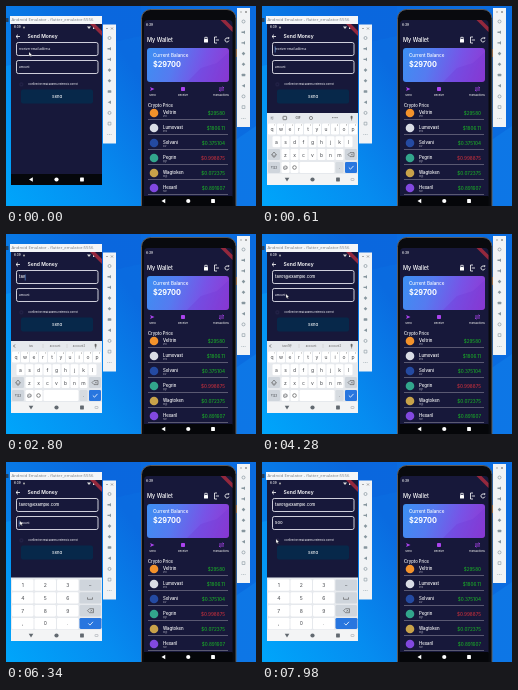
Animation, 250 px wide and 200 px high, one loop 8 s. Source, as an HTML page with a canvas:

```html
<!DOCTYPE html>
<html lang="en">
<head>
<meta charset="utf-8">
<style>
html, body { margin: 0; width: 100%; height: 100%; overflow: hidden; background: #0873d8 }
canvas { display: block; width: 250px; height: 200px }
</style>
</head>
<body>
<canvas id="stage" width="250" height="200"></canvas>
<script>
const c = document.getElementById('stage').getContext('2d');
const LOOP = 8000, NAVY = '#17183a', EMAIL = 'tavo1@example.com';

function box(x, y, w, h, fill, r = 0, stroke, width = 0.8) {
  c.beginPath();
  c.roundRect(x, y, w, h, r);
  if (fill) { c.fillStyle = fill; c.fill(); }
  if (stroke) { c.strokeStyle = stroke; c.lineWidth = width; c.stroke(); }
}
function dot(x, y, r, fill, stroke) {
  c.beginPath();
  c.arc(x, y, r, 0, 7);
  if (fill) { c.fillStyle = fill; c.fill(); }
  if (stroke) { c.strokeStyle = stroke; c.lineWidth = 0.7; c.stroke(); }
}
function path(points, color, filled, width = 0.8) {
  c.beginPath();
  points.forEach(([x, y]) => c.lineTo(x, y));
  if (filled) { c.closePath(); c.fillStyle = color; c.fill(); }
  else { c.strokeStyle = color; c.lineWidth = width; c.stroke(); }
}
function text(s, x, y, size, color = '#fff', align = 'left', weight = 500, font = 'Inter') {
  c.font = `${weight} ${size}px "${font}", sans-serif`;
  c.fillStyle = color;
  c.textAlign = align;
  c.textBaseline = 'middle';
  c.fillText(s, x, y);
}
function gradient(x0, y0, x1, y1, ...colors) {
  const g = c.createLinearGradient(x0, y0, x1, y1);
  colors.forEach((color, i) => g.addColorStop(i / (colors.length - 1), color));
  return g;
}
// Last value whose start time has passed
const stepAt = (steps, t) => steps.reduce((v, [at, n]) => t >= at ? n : v, 0);
const ease = (t, start, length) => {
  const p = Math.min(1, Math.max(0, (t - start) / length));
  return 1 - (1 - p) ** 3;
};

function wallpaper() {
  box(0, 0, 250, 200, gradient(0, 190, 220, 40, '#00a4fa', '#068cf0', '#0a6be0', '#0a6ce0'));
  path([[0, 0], [135, 0], [135, 30], [0, 60]], '#0a62d855', true);
  path([[228, 135], [250, 120], [250, 200], [228, 200]], '#1288ee66', true);
}

function toolbar(x, y) {
  box(x, y, 13, 119, '#f1f3f5');
  path([[x + 3, y + 4], [x + 5, y + 4]], '#777', false, 0.6);
  path([[x + 8, y + 3], [x + 10, y + 5]], '#777', false, 0.6);
  path([[x + 10, y + 3], [x + 8, y + 5]], '#777', false, 0.6);
  const cx = x + 6.5, ink = '#87969e';
  for (let i = 0; i < 10; i++) {
    const cy = y + 13.5 + i * 10.7;
    if (i == 0 || i == 7) dot(cx, cy, 1.5, null, ink);
    else if (i == 1 || i == 2) path([[cx - 2, cy - 0.7], [cx, cy - 0.7], [cx + 1.5, cy - 1.8], [cx + 1.5, cy + 1.8], [cx, cy + 0.7], [cx - 2, cy + 0.7]], ink, true);
    else if (i == 3 || i == 4) path([[cx - 1.8, cy], [cx, cy - 1.8], [cx + 1.8, cy], [cx, cy + 1.8]], ink, true);
    else if (i == 5) box(cx - 1.8, cy - 1.3, 3.6, 2.6, ink, 0.6);
    else if (i == 6) path([[cx + 1.5, cy - 1.8], [cx - 1.8, cy], [cx + 1.5, cy + 1.8]], ink, true);
    else if (i == 8) box(cx - 1.4, cy - 1.4, 2.8, 2.8, null, 0, ink, 0.6);
    else text('•••', cx, cy, 3.2, ink, 'center');
  }
}

function navBar(x, y, w, h, bg, ink, down) {
  box(x, y, w, h, bg);
  const cy = y + h / 2, a = x + w * 0.22, b = x + w * 0.78;
  path(down
    ? [[a - 2.3, cy - 1.8], [a + 2.3, cy - 1.8], [a, cy + 2]]
    : [[a - 2, cy], [a + 1.8, cy - 2.3], [a + 1.8, cy + 2.3]], ink, true);
  dot(x + w / 2, cy, 2.1, ink);
  box(b - 1.9, cy - 1.9, 3.8, 3.8, ink, 0.4);
  if (down) box(x + w - 7, cy - 1, 3, 2, null, 0.4, '#a5aab0', 0.6);
}

function banner(right, top) {
  path([[right - 12, top], [right - 7, top], [right, top + 7], [right, top + 12]], '#94283d', true);
}

function wallet() {
  box(229, 43, 2.5, 8, '#c77b3d');
  box(135.5, 3.5, 94.5, 205, '#090a0e', 9, '#5f5a57', 1);
  box(138, 14, 88.5, 177, NAVY, [4, 4, 0, 0]);
  text('6:39', 140, 19, 3.2);
  banner(226.5, 14);
  text('My Wallet', 141, 34, 5.5);
  box(198, 33, 4, 3.6, '#fff', 0.5);
  path([[198.8, 33], [198.8, 31.3], [201.2, 31.3], [201.2, 33]], '#fff');
  path([[211, 31], [208.5, 31], [208.5, 37], [211, 37]], '#fff');
  path([[209.8, 34], [213, 34]], '#fff');
  c.beginPath();
  c.arc(221, 34, 2, 0.3, 5.5);
  c.stroke();
  path([[221.5, 31.5], [223.3, 31.2], [223, 33.2]], '#fff', true);

  box(141, 42, 82, 34, gradient(141, 45, 223, 72, '#3d8ff3', '#557bf0', '#7853e6', '#9038d2'), 3);
  path([[181, 76], [195, 62], [211, 57], [223, 46], [223, 73], [220, 76]], '#6f35d144', true);
  text('Current Balance', 147, 50, 4.6);
  text('$29700', 147, 59, 7.3, '#fff', 'left', 700);

  const pink = '#ab43ee';
  path([[144, 81], [148.5, 83], [144, 85], [145, 83]], pink, true);
  box(175, 81, 4, 4, pink, 0.7);
  path([[213, 82], [218, 82], [216.5, 80.7]], pink);
  path([[218, 84], [213, 84], [214.5, 85.3]], pink);
  ['Send', 'Receive', 'Transactions'].forEach((s, i) => text(s, [146.5, 177, 215][i], 89.7, 2.6, '#eee', 'center'));
  text('Crypto Price', 142, 100, 4.2);

  const coins = [
    ['Veltrin', 'vtn', '$29580', '#f3922b'],
    ['Lumovast', 'lmv', '$1806.11', '#d9dce5'],
    ['Solvani', 'slv', '$0.375104', '#244aa1'],
    ['Pegrin', 'pgr', '$0.998875', '#32a58c'],
    ['Wagtoken', 'wgt', '$0.072375', '#c8a24a'],
    ['Hexaril', 'hxr', '$0.891607', '#8148df']
  ];
  coins.forEach(([name, code, price, color], i) => {
    const y = 107 + i * 15;
    dot(148, y, 4.3, color);
    text(name, 157, y - 0.7, 4.3);
    text(code, 157, y + 3.6, 2.4, '#a1a0b2');
    text(price, 219, y + 1, 4.6, i == 3 ? '#c42f3c' : '#1aab28', 'right');
    path([[142, y + 6.5], [222, y + 6.5]], '#77768c', false, 0.7);
  });
  navBar(138, 190, 88.5, 10, '#050609', '#fff');
}

function field(y, value, hint, focused, t) {
  box(10.5, y, 81.5, 13, null, 1.8, '#e4e4ec', 0.9);
  text(value || hint, 13, y + 6.7, value ? 4.1 : 2.9, value ? '#fff' : '#dcdce6');
  if (focused && t % 1000 < 500) {
    const x = 13.2 + (value ? c.measureText(value).width : 0);
    path([[x, y + 4], [x, y + 10]], '#6da6ee', false, 0.6);
  }
}

function key(s, x, y, w, h, pressed, fill = '#fff') {
  box(x, y, w, h, pressed ? '#bcc9db' : fill, 1.3);
  text(s, x + w / 2, y + h / 2 + 0.4, s.length > 1 ? 3 : 5, '#44474c', 'center', 400);
}

function letters(t, count) {
  const pressed = [2200, 2410, 2680, 3000, 3250, 3590].some(at => t >= at && t < at + 120) ? EMAIL[count - 1] : '';
  box(5, 107, 91, 62, '#e6e9ed');
  if (count) {
    [EMAIL.slice(0, Math.min(count, 6)), 'account', 'account2'].forEach((s, i) => text(s, 25 + i * 24, 112, 2.8, '#666', 'center', 400));
    path([[37, 110], [37, 114]], '#bbb', false, 0.4);
    path([[61, 110], [61, 114]], '#bbb', false, 0.4);
    path([[9, 110.5], [7.5, 112], [9, 113.5]], '#555');
  } else {
    dot(10, 112, 2.1, '#d0d4da');
    path([[10.6, 110.8], [9.4, 112], [10.6, 113.2]], '#555', false, 0.5);
    box(21, 110.3, 3.6, 3.4, null, 0.5, '#666');
    text('GIF', 36, 112, 3.2, '#555', 'center', 600);
    dot(49, 112, 1.6, null, '#666');
    text('•••', 73, 112, 4, '#666', 'center');
  }
  box(88.7, 109.7, 1.8, 3.2, '#666', 0.9);
  path([[89.6, 113], [89.6, 114.5]], '#666', false, 0.6);
  ['qwertyuiop', 'asdfghjkl', 'zxcvbnm'].forEach((row, r) => {
    [...row].forEach((s, i) => {
      const x = 6 + i * 9 + [0, 4.5, 13.5][r], y = 117.5 + r * 12.8;
      key(s, x, y, 8, 11, s == pressed);
      if (!r) text(String((i + 1) % 10), x + 6.6, y + 2, 1.8, '#888', 'center');
    });
  });
  box(6, 143.1, 12, 11, '#cfd5dc', 1.3);
  path([[9.5, 149], [12, 146], [14.5, 149], [13, 149], [13, 151], [11, 151], [11, 149], [9.5, 149]], '#555', false, 0.6);
  box(83, 143.1, 12, 11, '#cfd5dc', 1.3);
  backspace(86, 148.6);
  key('?123', 6, 156, 12, 11, false, '#cfd5dc');
  key('@', 19.5, 156, 8, 11);
  box(28.5, 156, 8, 11, '#fff', 1.3);
  dot(32.5, 161.5, 1.8, null, '#555');
  box(37.5, 156, 35, 11, '#fff', 1.3);
  key('.', 73.5, 156, 8, 11, false, '#d6dbe0');
  enter(83, 156, 12, 11);
}

function backspace(x, y) {
  path([[x, y], [x + 2, y - 2], [x + 6, y - 2], [x + 6, y + 2], [x + 2, y + 2], [x, y]], '#555', false, 0.6);
  path([[x + 3, y - 0.9], [x + 4.8, y + 0.9]], '#555', false, 0.5);
  path([[x + 4.8, y - 0.9], [x + 3, y + 0.9]], '#555', false, 0.5);
}

function enter(x, y, w, h) {
  box(x, y, w, h, '#2876df', 1.3);
  const cx = x + w / 2, cy = y + h / 2;
  path([[cx - 2.2, cy], [cx - 0.5, cy + 1.7], [cx + 2.5, cy - 1.6]], '#fff');
}

function numbers(t, amount) {
  box(5, 115.5, 91, 54, '#e6e9ed');
  const down = [6980, 7250, 7400].some(at => t >= at && t < at + 110) ? amount.slice(-1) : '';
  ['123−', '456␣', '789⌫', ',0.✓'].forEach((row, r) => [...row].forEach((s, i) => {
    const x = 6 + i * 22.5, y = 117.5 + r * 12.8, side = i == 3;
    if (s == '✓') return enter(x, y, 22, 11);
    key('␣⌫'.includes(s) ? '' : s, x, y, 21.5, 11.3, s == down, side ? '#cfd5dc' : '#fff');
    if (s == '⌫') backspace(x + 8, y + 5.6);
    if (s == '␣') path([[x + 8, y + 5], [x + 8, y + 7], [x + 13, y + 7], [x + 13, y + 5]], '#555', false, 0.6);
  }));
}

// Mouse stops: time, x, y
const stops = [
  [0, 23, 46], [300, 23, 46], [3890, 60, 84], [4280, 24, 60], [4700, 24, 60],
  [5300, 14, 59], [6600, 14, 59], [6980, 39, 134], [7150, 39, 134],
  [7250, 39, 160], [7500, 39, 160], [7980, 14, 77], [LOOP, 14, 77]
];
function mouse(t) {
  if (t > 600 && t < 3890) return;
  const i = stops.findLastIndex(s => s[0] <= t), a = stops[i], b = stops[i + 1] || a;
  const p = i == 1 ? 0 : (t - a[0]) / (b[0] - a[0] || 1);
  const x = a[1] + (b[1] - a[1]) * p, y = a[2] + (b[2] - a[2]) * p;
  const arrow = [[x, y], [x, y + 4.2], [x + 1, y + 3.3], [x + 1.8, y + 4.8], [x + 2.4, y + 4.4], [x + 1.7, y + 3], [x + 3, y + 3]];
  path(arrow, '#fff', true);
  path([...arrow, arrow[0]], '#333', false, 0.25);
}

function sender(t) {
  const count = stepAt([[2200, 1], [2410, 2], [2680, 3], [3000, 4], [3250, 5], [3590, 6], [3890, 9], [4020, 13], [4150, 17]], t);
  const amount = '500'.slice(0, stepAt([[6980, 1], [7250, 2], [7400, 3]], t));
  box(0, 12, 2.5, 4, '#24405e');
  box(4, 10, 92, 8, '#f4f6f8');
  text('Android Emulator - flutter_emulator:5556', 5.5, 14, 4.25, '#777d83', 'left', 400, 'Open Sans');
  box(5, 18, 91, 161, NAVY);
  text('6:39', 8, 21.5, 3);
  dot(18, 21.5, 1, '#aaa');
  path([[81, 20.5], [85, 20.5], [83, 23]], '#ddd', true);
  box(87, 20, 1.5, 3, '#ddd');
  banner(96, 18);
  path([[14, 30.5], [10, 30.5], [12, 28.6]], '#fff');
  path([[10, 30.5], [12, 32.4]], '#fff');
  text('Send Money', 21.5, 30.5, 5, '#fff', 'left', 600);
  field(36.5, EMAIL.slice(0, count), 'receiver email address', t >= 140 && t < 4660, t + 500);
  field(54.5, amount, 'amount', t >= 4660, t);
  box(14, 77, 2.8, 2.8, null, 0.3, '#2f2e55', 0.6);
  text('I confirm the email address entered is correct', 22, 78.5, 2.3, '#f0f0f5');
  box(15, 83.5, 72, 14, '#07284a', 2);
  text('Send', 51, 90.5, 4, '#fff', 'center');

  c.save();
  c.beginPath();
  c.rect(5, 100, 91, 69);
  c.clip();
  if (t < 4800) {
    c.translate(0, 62 * (1 - ease(t, 140, 370)));
    if (t >= 140) letters(t, count);
  } else {
    c.translate(0, 54 * (1 - ease(t, 4800, 350)));
    numbers(t, amount);
  }
  c.restore();
  const open = t >= 280;
  navBar(5, 168, 91, 11, open ? '#f3f4f5' : '#05070b', open ? '#626970' : '#fff', open);
  mouse(t);
}

function draw(now) {
  wallpaper();
  wallet();
  toolbar(97, 18.5);
  toolbar(231, 2);
  sender(now % LOOP);
  requestAnimationFrame(draw);
}
requestAnimationFrame(draw);
</script>
</body>
</html>
```
